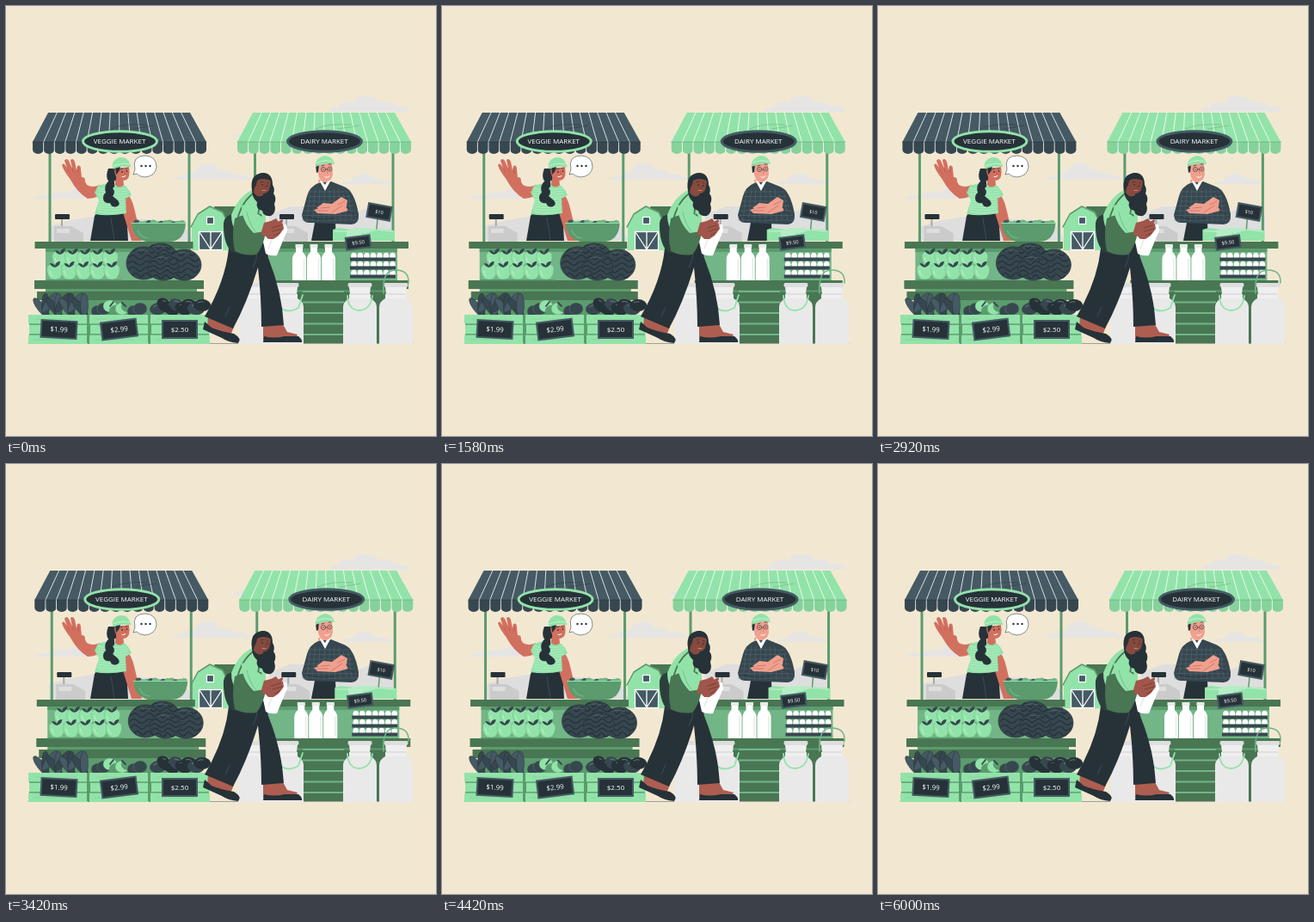
An HTML page for the animation above (6040 ms loop, 500 by 500 pixels).

```html
<!DOCTYPE html>
<html lang="en">
<head>
<meta charset="utf-8">
<title>Market stalls</title>
<style>
html, body { margin: 0; width: 100%; height: 100%; overflow: hidden; background: #f2e8d1; }
svg { display: block; width: 100vw; height: 100vh; }
text { font-family: "Open Sans", Lato, sans-serif; font-size: 8px; fill: #fff; text-anchor: middle; }
</style>
</head>
<body>
<svg id="stage" viewBox="0 0 500 500"></svg>
<script>
const MINT = '#92e3a9', PALE = '#b5edc4', GREEN = '#72b587', MID = '#5b9b6d', DEEP = '#497653';
const INK = '#263238', SLATE = '#37474f', STEEL = '#455a64', GRAY = '#e9e9e9', SHADE = '#dedede';

const path = (d, fill, more = '') => `<path d="${d}" fill="${fill}" ${more}/>`;
const line = (d, color, w = 1, more = '') =>
  path(d, 'none', `stroke="${color}" stroke-width="${w}" stroke-linecap="round" stroke-linejoin="round" ${more}`);
const rect = (x, y, w, h, fill, more = '') =>
  `<rect x="${x}" y="${y}" width="${w}" height="${h}" fill="${fill}" ${more}/>`;
const oval = (x, y, rx, ry, fill, more = '') =>
  `<ellipse cx="${x}" cy="${y}" rx="${rx}" ry="${ry}" fill="${fill}" ${more}/>`;
const label = (x, y, s, more = '') => `<text x="${x}" y="${y}" ${more}>${s}</text>`;
const repeat = (n, f) => Array.from({ length: n }, (_, i) => f(i)).join('');
const group = (s, more) => `<g ${more}>${s}</g>`;

function tag(x, y, w, h, turn, s, size) {
  return group(
    rect(-w / 2, -h / 2, w, h, INK, `stroke="${STEEL}" stroke-width="2"`) +
    label(0, size * .36, s, `style="font-size:${size}px"`),
    `transform="translate(${x} ${y}) rotate(${turn})"`);
}

function backdrop() {
  const cloud = '#e6e5e4';
  return path('M376 123q1-6 10-5 0-7 9-6 4-2 8 0 2-7 12-7 12-2 20 7 9-3 17 4 13-1 18 7Z', cloud) +
    path('M193 202q5-4 13-4 3-6 14-5 2-8 12-10 10-2 16 7 10 0 16 5 14 0 23 7Z', cloud) +
    path('M32 224q5-5 19-4 10-6 22-4 9-8 18-2l12 10Z', cloud) +
    path('M390 207q3-5 12-4 3-8 15-8 9 1 12 6 15 0 20 6Z', cloud) +
    path('M264 152q2-4 9-4 4-4 9-1v5Z', cloud) +
    path('M50 273v-17l24-7 27-4 42 2 62 4 12 22Z', SHADE) +
    path('M306 273v-30l24-10 20 0 14 8 28 6 28-12 30 8v30Z', SHADE) +
    path('M242 233h30v41h-20Z', DEEP) +
    line('M216 283.500h50', MID, 1) +
    path('M216 284v-29l7-13 14-9 15 6 8 16v29Z', MINT) +
    line('M215 257l8-15 14-9 15 7 8 16', MID, 1.5) +
    rect(233.500, 245.500, 8, 8, STEEL, 'stroke="#fff" stroke-width="1.2"') +
    rect(224.500, 262.500, 27, 21, STEEL, 'stroke="#fff" stroke-width="1.3"') +
    line('M225 263l13 20 13-20M238 263v20', '#fff', 1.3) +
    line('M26 392.500H473', '#65736a', .6);
}

function waver() {
  const skin = '#d2705f', crease = '#a84f48';
  return path('M98 273l5-29 4-6h33l2 35Z', INK) +
    line('M122 247l4 25', STEEL, .7) +
    path('M75 202Q83 217 95 224 108 223 114 216L109 208Q101 212 94 208L89 199Z', skin) +
    path('M76 203q-9-11-11-18 2-4 5 2l2 4-4-11q2-4 5 0l4 9-2-10q3-3 5 2l2 10 1-5q4-2 4 4l1 10q3-2 4 2l-2 8Z', skin) +
    line('M70 187l4 7m3-5l2 5m5-5l0 5', crease, .5) +
    path('M140 218q6 4 9 17l9 38h-12l-11-36Z', skin) +
    path('M107 209q12-5 27-2 8 2 12 13l-7 4 1 17q-20 4-37 1l5-16-5-9Z', MINT) +
    repeat(10, i => line(`M${106 + i % 2} ${212 + i * 3}q16 3 ${i > 3 ? 32 : 35} 0`, '#c6f2d2', .65)) +
    path('M127 198l9 2 1 8q-5 5-10 0Z', skin) +
    path('M119 189h10l-1 13q-6 6-10 0-2-6 1-13Z', INK) +
    path('M127 188q7 1 16-1 2 13-3 15-7 3-12-4-3-6-1-10Z', skin) +
    path('M127 187h6q-1 6-5 9Z', INK) +
    path('M121 202q6 0 5 5 1 3-2 5 4 4 0 9l6 5q4 5-1 7-6 2-8-4-8 1-8-6 0-4 3-6-3-9 5-15Z', INK) +
    path('M124 189q-2-10 8-13 10-1 12 8l2 3q-10-1-17 1-4 2-5 1Z', MINT) +
    line('M125 186q8-4 18-2', '#c6f2d2', 1) +
    oval(135, 193, .8, 1, INK) + oval(140.500, 192, .7, 1, INK) +
    line('M133 190l3-1m3 0l2 0', INK, .7) +
    line('M135 198.500q2 1 4-1', '#fff', 1) +
    line('M138 193l1 3', crease, .6) +
    path('M150 190q-4-16 12-16 13 1 13 13-1 11-14 12-7-1-9-4l-4 1Z', '#fff', `stroke="${SLATE}" stroke-width=".6"`) +
    repeat(3, i => oval(157.500 + i * 5, 186, 1.2, 1.2, INK));
}

function dairyman() {
  const skin = '#f0a08e';
  return path('M355 273l4-21h24l1 21Z', INK) +
    path('M363 202l12-1 2 13h-13Z', skin) +
    path('M363 206Q353 210 350 221L344 243Q345 253 354 252L402 254Q411 253 410 242 405 214 393 210L378 204Z', SLATE) +
    repeat(9, i => line(`M${354 + i * 5.500} ${i > 6 ? 219 : 213}l${i - 4} ${i > 6 ? 29 : 37}`, '#566a74', .5)) +
    repeat(7, i => line(`M${353 - i * 1.4} ${216 + i * 5.500}H${398 + i * 1.9}`, '#566a74', .5)) +
    path('M365 204l6 11 6-11-2-3-4 7-5-6Z', '#fff') +
    path('M361 184q10-6 18-1l1 13q-2 8-8 9-7 0-9-9Z', skin) +
    path('M360 184h4l-1 9-2 1Z', INK) +
    path('M360 187q-1-10 10-13 10 0 12 10-9-2-17 1Z', MINT) +
    line('M362 182q9-4 18-1', '#c6f2d2', 1) +
    `<g fill="none" stroke="${INK}" stroke-width=".6"><circle cx="369" cy="190" r="2.6"/><circle cx="376.500" cy="189.500" r="2.5"/></g>` +
    line('M371.500 190h2.500M367 186l3-1m5-1h3', INK, .7) +
    oval(369, 190, .6, .8, INK) + oval(376.500, 189.500, .6, .8, INK) +
    line('M371 199q3 1 5-1', '#fff', 1) +
    line('M373 191l1 4', '#c9685e', .6) +
    path('M361 235l8-6 10 1 11-8 7 4-1 7-17 7Z', skin) +
    path('M398 238l-15 4-21-1-4-4 14-4 22-2Z', skin) +
    line('M362 238l12 0M366 235l10-1m3 6l12-8m3-5l-8 4', '#b95f58', .6) +
    line('M350 245q13 5 32 2m15-9l8 5', INK, .8);
}

function awning(x, top, low, dark, edge) {
  const n = 16, w = 202 / n;
  const at = i => 31 + i * w, head = i => 49 + i * 165 / n;
  const stripe = i => `M${head(i)} 124L${at(i)} 158V170`;
  return group(
    path('M49 124H214L233 158H31Z', top) +
    path('M31 158H233V167' + repeat(n, () => `a${w / 2} 5 0 0 1-${w} 0`) + 'Z', low) +
    repeat(n - 1, i => line(stripe(i + 1), '#fff', .8)) +
    line('M122 143q14-7 41-5M148 143l24-4', dark, .8, 'opacity=".5"') +
    line('M31 158H233', dark, .5) +
    oval(132.500, 157.500, 43, 11.800, INK, `stroke="${edge}" stroke-width="3"`),
    `transform="translate(${x} 0)"`);
}

function apple(x, y) {
  return path(`M${x} ${y - 6}q6-4 9 2 1 8-4 13-5 2-10 0-5-5-4-13 3-6 9-2Z`, MINT, `stroke="${GREEN}" stroke-width=".5"`) +
    line(`M${x - 6} ${y}q0 4 3 6`, '#c6f2d2', 1) +
    path(`M${x} ${y - 4}q-5-1-6-5 4 0 6 3 1-5 6-5 0 5-6 7Z`, SLATE);
}

function melon(x, y, rx, ry) {
  const zig = rx * .24;
  return oval(x, y, rx, ry, SLATE, `stroke="${INK}" stroke-width=".7"`) +
    repeat(5, i => {
      const v = (i - 2) * .36, half = rx * Math.sqrt(1 - v * v) * .9;
      return line(`M${x - half} ${y + v * ry}q${half / 4}-${zig} ${half / 2} 0t${half / 2} 0 ${half / 2} 0 ${half / 2} 0`, INK, 1.3);
    }) + line(`M${x - rx * .4} ${y - ry * .75}q${rx * .3}-2 ${rx * .7} 0`, '#5a6b74', .8);
}

function register(x, y) {
  return rect(x, y, 17, 6, INK, 'rx="1"') + rect(x + 7, y + 6, 2, 8, '#aaa') +
    path(`M${x - 1} ${y + 32}v-18h20l14 8v10Z`, '#cbcbcb') + rect(x + 2, y + 17, 15, 5, '#dedede');
}

function veggieStall() {
  return rect(49.500, 165, 3, 110, MID) + rect(211.500, 165, 3, 110, MID) +
    register(57, 242) +
    rect(46, 282, 169, 38, GREEN) + rect(46, 282, 169, 4, MID) +
    rect(46, 329, 176, 17, MID) +
    rect(33.500, 274, 184, 8, DEEP) +
    rect(33, 319, 197, 10, DEEP) + rect(36, 332, 194, 10, DEEP) +
    repeat(5, i => apple(63 + i * 14.500, 293)) + repeat(5, i => apple(57 + i * 16.500, 308)) +
    rect(46, 318, 88, 1.500, MID) +
    melon(180, 291, 19, 15) + melon(160, 299, 20, 19) + melon(207, 301, 20, 18) + melon(183, 304, 18, 15) +
    repeat(12, i => oval(152 + i * 4.800, 251 + (i * 7 % 4) * .6, 3.500, 2.500, i % 3 ? GREEN : STEEL)) +
    path('M146 252H209Q208 274 189 274H163Q147 270 146 252Z', MID) +
    line('M146 252.500H209', MINT, 1.2) + line('M153 261q3 8 12 9', GREEN, 1.2) +
    awning(0, STEEL, SLATE, INK, MINT) +
    label(132, 160.300, 'VEGGIE MARKET');
}

function bottle(x) {
  return path(`M${x - 4} 279h8v7q4 4 4 8v25h-16v-25q0-4 4-8Z`, '#fff') +
    rect(x - 4.500, 277, 9, 4, '#e6ece8') + line(`M${x + 5.500} 294v22`, GRAY, 1.5);
}

function dairyStall() {
  return rect(288, 165, 3, 110, MID) + rect(448.500, 165, 3, 110, MID) +
    register(318, 242) +
    rect(300, 282, 155, 38, GREEN) + rect(300, 282, 155, 4, MID) +
    rect(296, 274, 172, 8, DEEP) +
    rect(310, 329, 145, 17, DEEP) + rect(296, 319, 172, 10, DEEP) +
    line('M310 331.500h145', MID, 2) +
    [341, 358, 375].map(bottle).join('') +
    repeat(3, r => repeat(7, i => oval(404.500 + i * 7.500, 291 + r * 10, 3.300, 4.300, '#fff')) +
      rect(400, 292.500 + r * 10, 53, 4, SLATE)) +
    path('M380 273v-13l7-2 16 2v13Z', MINT) +
    path('M396 273v-12l12-3h14l8 2v13Z', PALE) + path('M414 273v-9l16-5 22 2v12Z', MINT) +
    line('M382 262h16m18 2l14-4 20 2', '#c6f2d2', 1) +
    line('M432 247l-1 12', MID, 1.5) +
    tag(434, 239.500, 27, 16, 10, '$10', 5.500) + tag(409.500, 275, 28, 14, -7, '$9.50', 5.800) +
    awning(238, MINT, '#86d29b', MID, STEEL) +
    label(370, 160.300, 'DAIRY MARKET');
}

function crate(x) {
  return rect(x + 1, 359, 67, 34, MID) +
    repeat(3, i => rect(x + i % 2, 359 + i * 11.800, 69 - i % 2, 10.400, MINT)) +
    line(`M${x + 8} 364h48m-40 12h38m-48 12h46`, '#80cf96', .6);
}

function crates() {
  const cucumbers = repeat(11, i => group(oval(0, 0, 4.500, 14, i % 2 ? SLATE : STEEL, `stroke="${INK}" stroke-width=".5"`),
    `transform="translate(${41 + i * 5} ${351 - i % 3 * 3}) rotate(${(i % 3 - 1) * 38})"`));
  const peppers = repeat(8, i => oval(107 + i * 7, 355 - i % 3 * 3, 8, 7,
    i < 2 || i > 5 ? SLATE : [MINT, MID][i % 2], `stroke="${MID}" stroke-width=".4"`)) +
    line('M121 349l4-5m14 5l-4-4m18 6l4-4', SLATE, 1.8);
  const eggplants = repeat(8, i => group(oval(0, 0, 10, 7, i % 3 ? INK : SLATE) + line('M-5-3q3-2 6-1', '#78868d', .8),
    `transform="translate(${177 + i * 7.300} ${352 - i % 2 * 4}) rotate(${i * 53 % 60 - 10})"`));
  return rect(46, 346, 178, 47, MID) + cucumbers + peppers + eggplants +
    [26, 97, 168].map(crate).join('') +
    rect(94, 359, 3, 33, MID) + rect(165, 359, 3, 33, MID) +
    tag(61.500, 376, 41, 20, 3, '$1.99', 8) +
    tag(131.500, 376, 41, 20, -7, '$2.99', 8) +
    tag(202, 376, 40, 20, 0, '$2.50', 8);
}

function can(x, w) {
  const m = x + w / 2;
  return path(`M${x} 393V350q0-6 7-10v-5h${w - 14}v5q7 4 7 10v43Z`, GRAY) +
    path(`M${m - 11} 340l-2-18h26l-2 18Z`, '#efefef') +
    rect(m - 14, 322, 28, 5, SHADE, 'rx="2"') +
    line(`M${m - 11} 335h22`, '#cfcfcf', 1);
}

function cans() {
  return rect(344, 346, 50, 46, DEEP) +
    repeat(5, i => rect(345, 331 + i * 12.500, 48, 2, GREEN)) +
    rect(429, 346, 6, 46, DEEP) +
    can(270, 37) + can(307, 39) + can(392, 39) + can(434, 39) +
    line('M316 346q8 14 24 5l5-15', MINT, 1.8) +
    line('M397 337q1 17 14 17 13-1 15-17', MINT, 1.8) +
    line('M439 334q-2-27 14-27 16 0 15 15', GREEN, 1.6);
}

function shopper() {
  const face = '#874a3e', hand = '#a0564a', leg = '#ad5e50', crease = '#5e302c';
  return path('M235 361l30 12-4 10q-12-1-27-9Z', leg) +
    path('M231 367l8 7q12 5 26 7 10 6 5 11-12-1-19-6l-22-10Z', INK) +
    path('M299 370h23l5 9 12 3-3 6h-37Z', leg) +
    path('M300 384q11 3 24 0l16 0q5 4 4 7h-45Z', INK) +
    path('M259 282Q255 320 231 361L264 375Q280 346 293 304 297 340 297 373L323 371Q321 333 305 293L301 276 262 274Z', INK) +
    line('M292 287q0 9-5 17m-32 57l5-11', STEEL, .7) +
    path('M306 253l20 1 1 7-12 29q-8 1-13-2l-3-14Z', '#fff') +
    line('M305 282l8-20', GRAY, 1.5) +
    path('M253 252q2-11 15-10l8 46-14-2q-10-12-9-34Z', '#2d3f3d') +
    path('M288 213q-18 8-26 30 0 12 6 20l29 1 5-17-1-18-5-13Z', MINT) +
    path('M266 247q17-8 31-5l5 22q-4 18-11 25-14 2-25-4-4-18 0-38Z', DEEP) +
    line('M289 217q-14 9-20 31m22-31q5 13 2 27', DEEP, 1.8) +
    path('M274 232q13-4 16 8l12 8 0 14-14 2q-14-14-14-32Z', MINT) +
    line('M280 240q4 16 10 22', GREEN, .8) +
    path('M300 252l8-2 6-3 3 4 5 2 1 6-6 8-6 4-6 0-4-4-5-1Z', hand) +
    path('M313 253l8-5q2 1 0 4l-5 5Z', hand) +
    line('M309 258l10-3m-9 7l11-3m-9 8l7-4', crease, .6) +
    path('M300 194q10 1 10 14 3 5 1 10 4 5 1 12 3 10-4 14-9 1-10-6-8-2-6-10-6-5-6-14 0-19 14-20Z', INK) +
    path('M289 209l11 2-1 9q-6 4-11-3Z', face) +
    path('M288 205q1-8 9-8 9 1 11 8l-2 9q-4 6-10 3-7-4-8-12Z', face) +
    path('M286 214q-3-19 13-20 7 1 9 9-10-4-16 0-1 8-6 11Z', INK) +
    oval(298, 208, .8, 1, INK) + oval(304, 209, .7, 1, INK) +
    line('M296 205l3-1m4 1l2 1', INK, .7) +
    line('M298 214.500q2 0 4 0', '#d98478', .9) +
    line('M302 209l0 3', crease, .6);
}

document.getElementById('stage').innerHTML =
  rect(0, 0, 500, 500, '#f2e8d1') + backdrop() + waver() + dairyman() +
  group(veggieStall() + dairyStall(), 'id="stalls"') +
  cans() + crates() + shopper();

const LOOP = 6040, SCALE = 2 / 3;
const sway = [0, -1, 2, -4, 4, -4, 4, -4, 2, -1, 0];
const stalls = document.getElementById('stalls');

// cubic-bezier(.25, .1, .25, 1), solved by bisection
function ease(x) {
  let lo = 0, hi = 1, s = .5;
  for (let i = 0; i < 20; i++) {
    s = (lo + hi) / 2;
    if (.75 * s * (1 - s) + s ** 3 < x) lo = s; else hi = s;
  }
  return .3 * s * (1 - s) ** 2 + 3 * s * s * (1 - s) + s ** 3;
}

function draw() {
  const p = performance.now() % LOOP / LOOP * 10, i = Math.floor(p);
  const dx = SCALE * (sway[i] + (sway[i + 1] - sway[i]) * ease(p - i));
  stalls.setAttribute('transform', `translate(${dx.toFixed(3)} 0)`);
  requestAnimationFrame(draw);
}
draw();
</script>
</body>
</html>
```
